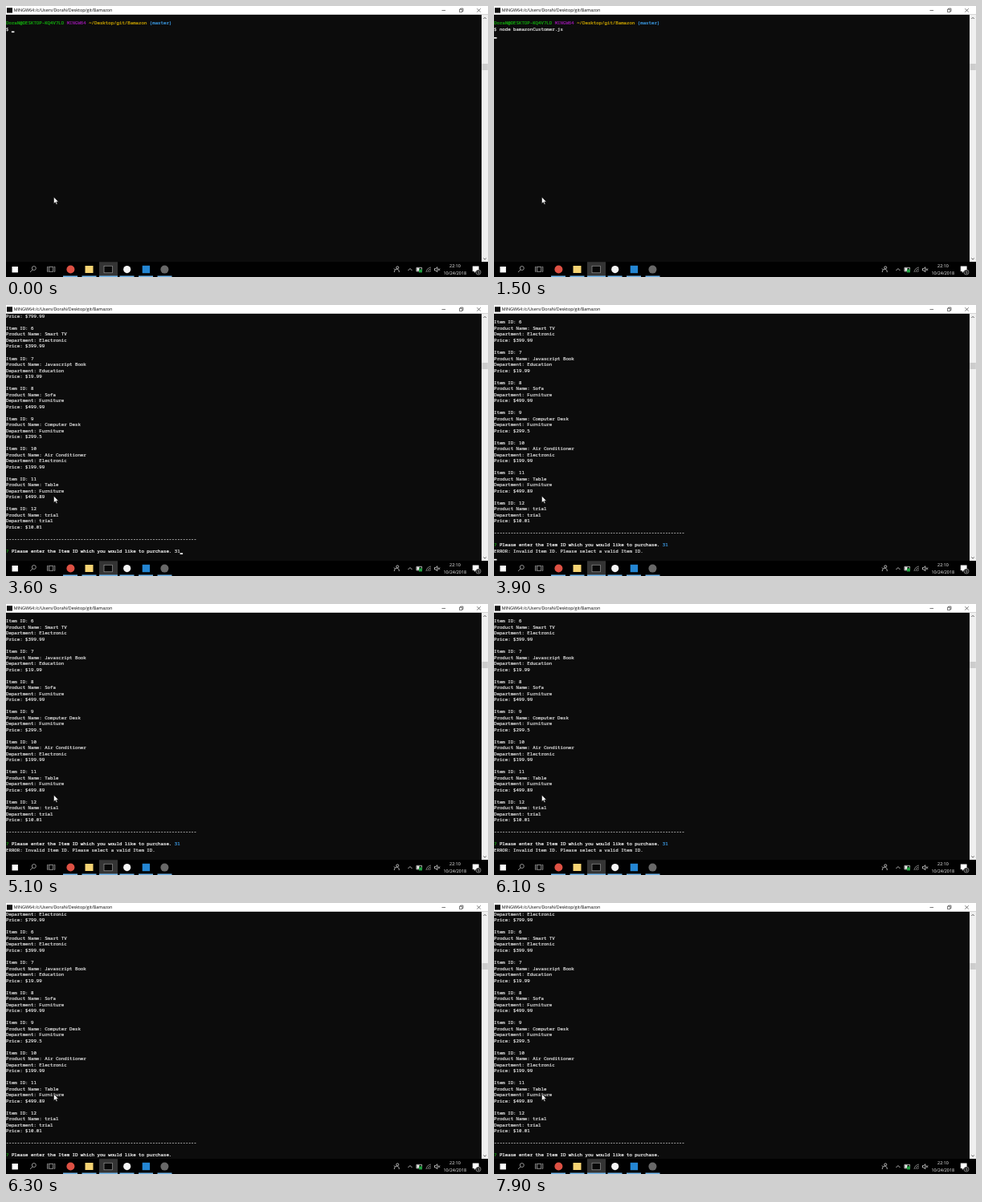
These frames come from a looping animation (600 px wide and 338 px high, 8 s). An HTML page:

```html
<!DOCTYPE html>
<html lang="en">
<head>
<meta charset="utf-8">
<title>Terminal session</title>
<style>
  html, body { margin: 0; width: 100%; height: 100%; overflow: hidden; background: #000; }
  #stage { position: absolute; left: 0; top: 0; width: 600px; height: 338px; overflow: hidden; background: #0c0c0c; }
  svg { position: absolute; left: 0; top: 0; text-rendering: geometricPrecision; font: 5.4px "Open Sans", sans-serif; }
  /* laid out at ten times the size so that glyph advances stay fractional */
  pre { position: absolute; left: 0; top: 10.35px; margin: 0; color: #d4d4d4; -webkit-text-stroke: 2.5px;
    font: 57.3px/75.1px "Noto Sans Mono", monospace; transform: scale(.1); transform-origin: 0 0; }
  .g { color: #13a10e } .m { color: #881798 } .y { color: #c19c00 } .c { color: #3a96dd } .w { color: #f2f2f2 }
</style>
</head>
<body>
<div id="stage">
  <pre id="text"></pre>
  <svg width="600" height="338" viewBox="0 0 600 338">
    <rect id="caret" width="3.5" height="1.7" fill="#f2f2f2"/>

    <!-- title bar -->
    <rect width="600" height="10.8" fill="#fff"/>
    <rect x="1" y="2.2" width="7" height="6.4" fill="#111"/>
    <text x="9.7" y="7.4">MINGW64:/c/Users/DoraN/Desktop/git/Bamazon</text>
    <path d="M542.5 5.5h4.6M564.5 4.2h3.4v3.4h-3.4zM565.6 4.2v-1.1h3.4v3.4h-1.1M586.4 3.2l4.4 4.4M590.8 3.2l-4.4 4.4"
      fill="none" stroke="#222" stroke-width=".6"/>

    <!-- scroll bar -->
    <rect x="592" y="10.8" width="8" height="308.4" fill="#f0f0f0"/>
    <rect id="thumb" x="592.4" width="7.4" height="8" fill="#cdcdcd"/>
    <path d="M594.4 16l1.7-1.7 1.7 1.7M594.4 314.5l1.7 1.7 1.7-1.7" fill="none" stroke="#505050" stroke-width=".9"/>

    <!-- task bar -->
    <rect y="319.2" width="600" height="18.8" fill="#010101"/>
    <rect x="116" y="319.2" width="23" height="18.8" fill="#343434"/>
    <path d="M71 337.2h18M94.5 337.2h18M116 337.2h23M141.5 337.2h18M165 337.2h18M188.5 337.2h18" stroke="#76b9ed" stroke-width="1.6"/>
    <rect x="7.5" y="325" width="7.4" height="7.4" fill="#fff"/>
    <g fill="none" stroke="#ccc" stroke-width=".7">
      <circle cx="34.8" cy="327" r="2.5"/><path d="M33 328.8l-3 3.2"/>
      <path d="M53.5 325.3h5.2v6h-5.2zM52.5 325.3h-1v6h1M59.8 325.3h1v6h-1"/>
    </g>
    <circle cx="80.4" cy="328.5" r="5" fill="#dd5144"/>
    <rect x="98.5" y="324" width="10" height="9" fill="#f5d373"/>
    <rect x="122" y="324.2" width="10.5" height="8.6" fill="#080808" stroke="#aaa" stroke-width=".6"/>
    <circle cx="150.7" cy="328.6" r="4.6" fill="#f4f4f4"/>
    <rect x="169.7" y="323.8" width="9.4" height="9.4" fill="#2486d3"/>
    <circle cx="197.4" cy="328.6" r="5" fill="#686868"/>

    <!-- tray -->
    <g fill="none" stroke="#ddd" stroke-width=".8">
      <circle cx="487.3" cy="326.3" r="1.5"/>
      <path d="M483.3 332c.3-4 3-4 4.3-3.5s1.7 1.5 1.7 3.5M483 327.5l1.5 1.5"/>
      <path d="M500.5 330l2.5-2.5 2.5 2.5"/>
      <path d="M511 326.3h6.6v4.6h-6.6z"/>
      <path d="M523 332a7 7 0 0 1 6-6M525 332a4.5 4.5 0 0 1 4-4M527 332a2.5 2.5 0 0 1 2-2" stroke="#999"/>
      <path d="M533.5 327.5h1.4l2-1.8v6l-2-1.8h-1.4zM538 327.5l2 2.3M540 327.5l-2 2.3"/>
    </g>
    <path d="M511.5 326.8h3v3.6h-3z" fill="#eee"/>
    <rect x="514" y="328.4" width="4" height="4" fill="#20a040"/>
    <g fill="#fff" text-anchor="middle">
      <text x="559" y="326.3">22:10</text>
      <text x="558.8" y="335.3">10/24/2018</text>
      <path d="M580.8 324.5h7.8v6.6h-4l-1.6 1.8v-1.8h-2.2z"/>
      <circle cx="588" cy="332" r="3.1" fill="#222" stroke="#ccc" stroke-width=".5"/>
      <text x="588" y="333.7" font-size="4.5">1</text>
    </g>

    <!-- pointer -->
    <path d="M59.5 238.2v8.2l1.9-1.7 1.3 2.9 1.3-.6-1.3-2.8h2.6z" fill="#fff" stroke="#000" stroke-width=".5"/>
  </svg>
</div>
<script>
const $ = id => document.getElementById(id);
const paint = (cls, s) => `<span class="${cls}">${s}</span>`;

const items = [
  ['Smart TV', 'Electronic', 399.99],
  ['Javascript Book', 'Education', 19.99],
  ['Sofa', 'Furniture', 499.99],
  ['Computer Desk', 'Furniture', 299.5],
  ['Air Conditioner', 'Electronic', 199.99],
  ['Table', 'Furniture', 499.89],
  ['trial', 'trial', 10.01],
];
const question = paint('g', '?') + paint('w', ' Please enter the Item ID which you would like to purchase. ');
const listing = ['Department: Electronic', 'Price: $799.99', '',
  ...items.flatMap(([name, dept, price], i) =>
    [`Item ID: ${i + 6}`, `Product Name: ${name}`, `Department: ${dept}`, `Price: $${price}`, '']),
  '-'.repeat(69), ''];

const shell = command => ['',
  [paint('g', 'DoraN@DESKTOP-KQ4V7LD'), paint('m', 'MINGW64'),
   paint('y', '~/Desktop/git/Bamazon'), paint('c', '(master)')].join(' '),
  '$ ' + command];
const ask = (skip, answer = '') => [...listing.slice(skip), question + answer];
const command = 'node bamazonCustomer.js';
const failed = [...ask(2, paint('c', '31')), 'ERROR: Invalid Item ID. Please select a valid Item ID.'];

// start time, lines, caret column, caret row
const scenes = [
  [0, shell(''), 2, 2],
  [100, shell(command), 25, 2],
  [1200, shell(command), 0, 3],
  [1700, ask(1), 61, 39],
  [3500, ask(1, '3'), 62, 39],
  [3600, ask(1, '31'), 63, 39],
  [3800, failed, 0, 40],
  [6200, ask(0), 61, 40],
];
// the caret turns off and on by turns
const blinks = [500, 1200, 1700, 2200, 2700, 3200, 4000, 4450, 5050, 5550, 6050, 6900, 7400];

let shown;
function frame() {
  const t = performance.now() % 8000;
  const scene = scenes.findLast(s => s[0] <= t);
  if (scene !== shown) {
    const [start, lines, col, row] = shown = scene;
    $('text').innerHTML = lines.join('\n');
    $('caret').setAttribute('x', col * 3.438);
    $('caret').setAttribute('y', 16.4 + row * 7.51);
    $('thumb').setAttribute('y', start < 6200 ? 72 : 75);
  }
  const on = blinks.filter(b => b <= t).length % 2 === 0;
  $('caret').style.visibility = on ? 'visible' : 'hidden';
  requestAnimationFrame(frame);
}
frame();
</script>
</body>
</html>
```
